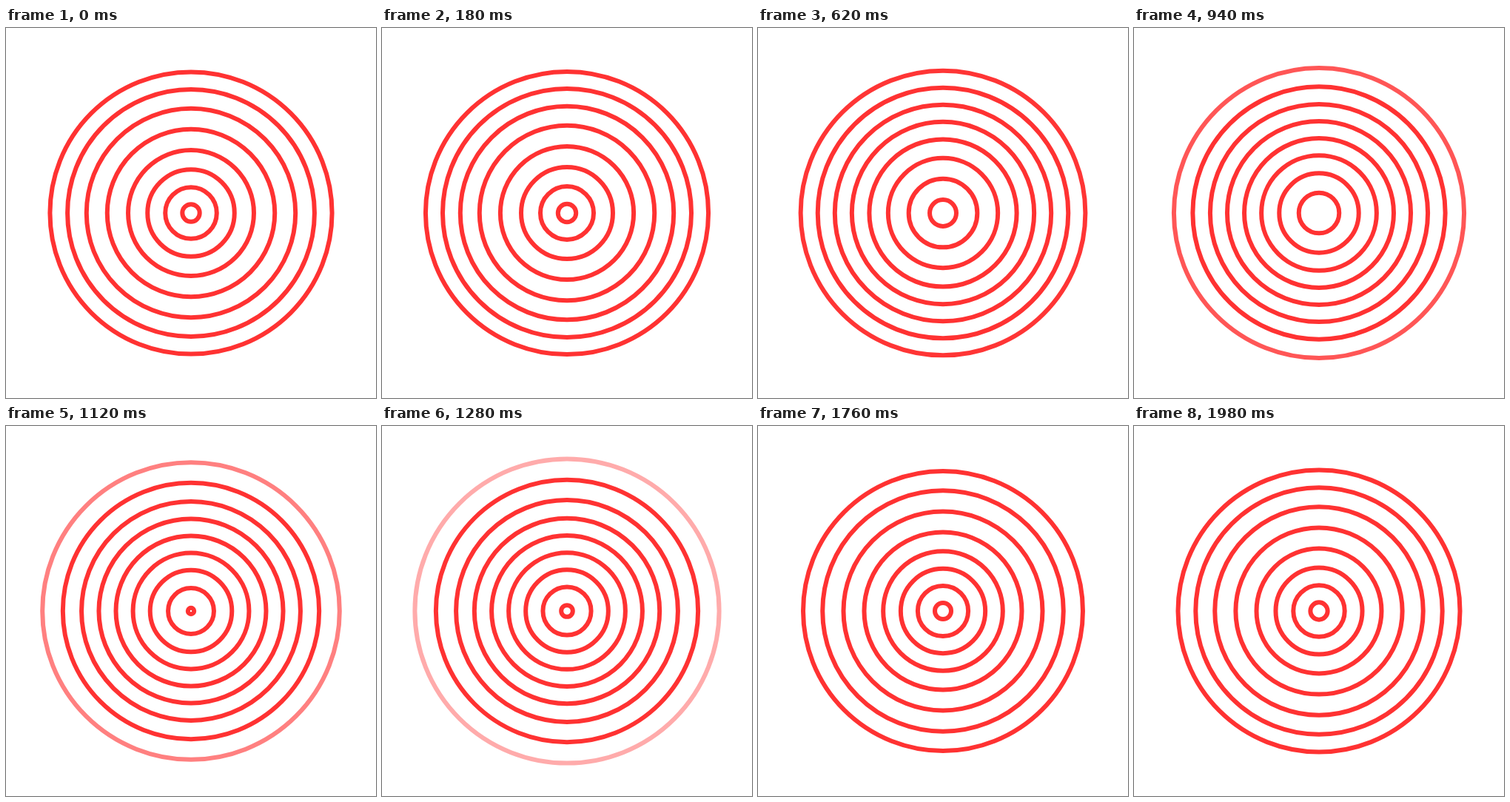
Write an HTML page with a canvas that moves like this. It is 500 px wide and 500 px high and loops after 2 s.

```html
<!DOCTYPE html>
<html lang="en">
<head>
<meta charset="utf-8">
<title>Expanding rings</title>
<style>
  html, body { margin: 0; width: 100%; height: 100%; overflow: hidden; background: #fff; }
  canvas { display: block; }
</style>
</head>
<body>
<canvas id="stage" width="500" height="500"></canvas>
<script>
const ctx = document.getElementById("stage").getContext("2d");
const LOOP = 2000, STEP = 20, RINGS = 9;
const BASE = 0.12, GAP = 25, SWAY = 3.95, SNAP = 0.6;
const FADE_FROM = 192, FADE_TO = 215, CUTOFF = 212.6;

// Steady growth plus a ripple that runs ten times over nine loops;
// the second harmonic makes each push quicker than the rest after it
function radius(age) {
  const a = 2 * Math.PI * age * (RINGS + 1) / RINGS;
  return BASE + GAP * age + SWAY * Math.sin(a) + SNAP * Math.sin(2 * a);
}

function drawRing(age) {
  const r = radius(age);
  if (r > CUTOFF) return;
  ctx.globalAlpha = Math.min(1, (FADE_TO - r) / (FADE_TO - FADE_FROM));
  ctx.beginPath();
  ctx.arc(250, 250, Math.max(r, 0), 0, 2 * Math.PI);
  ctx.stroke();
}

function draw(ms) {
  const frame = Math.floor((ms % LOOP) / STEP) + 1;
  const first = (frame * STEP / LOOP + 0.5) % 1;
  ctx.globalAlpha = 1;
  ctx.fillStyle = "#fff";
  ctx.fillRect(0, 0, 500, 500);
  ctx.strokeStyle = "#ff3232";
  ctx.lineWidth = 6;
  for (let i = 0; i < RINGS; i++) drawRing(first + i);
}

let start = null;
function tick(now) {
  if (start === null) start = now;
  draw(now - start);
  requestAnimationFrame(tick);
}
draw(0);
requestAnimationFrame(tick);
</script>
</body>
</html>
```
